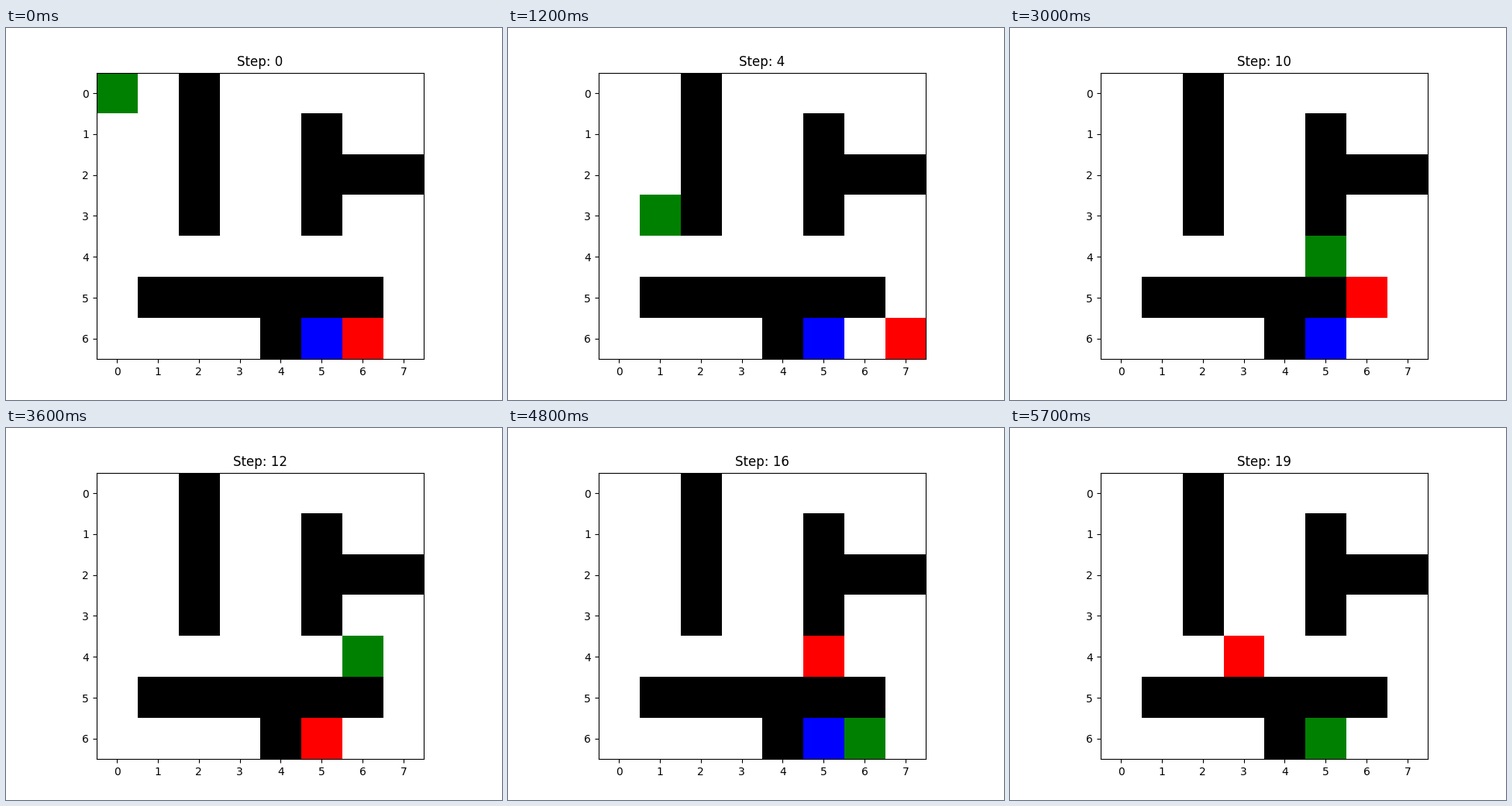
Recreate the animation shown at these times as a matplotlib script. Size 640x480 px, loop 6000 ms.

```python
import matplotlib.pyplot as plt
import numpy as np
from matplotlib.animation import FuncAnimation
from matplotlib.colors import to_rgb

MAZE = [
    "..#.....",
    "..#..#..",
    "..#..###",
    "..#..#..",
    "........",
    ".######.",
    "....#...",
]
GOAL = (6, 5)
STEP = {".": (0, 0), "N": (-1, 0), "S": (1, 0), "E": (0, 1), "W": (0, -1), "NW": (-1, -1)}
AGENT_MOVES = "E S S S S E E E E . . E E S S W W . ."
CHASER_MOVES = ". E W E N . . W . . W S . . N N S NW W"


def walk(start, moves):
    """Return the (row, column) cell held at every step."""
    steps = [start] + [STEP[m] for m in moves.split()]
    return [tuple(cell) for cell in np.cumsum(steps, axis=0)]


agent = walk((0, 0), AGENT_MOVES)
chaser = walk((6, 6), CHASER_MOVES)

base = np.array([[to_rgb("black" if c == "#" else "white") for c in row] for row in MAZE])
base[GOAL] = to_rgb("blue")


def grid(step):
    cells = base.copy()
    cells[agent[step]] = to_rgb("green")
    cells[chaser[step]] = to_rgb("red")
    return cells


fig, ax = plt.subplots(figsize=(6.4, 4.8), dpi=100)
image = ax.imshow(grid(0))
title = ax.set_title("Step: 0")


def update(step):
    image.set_data(grid(step))
    title.set_text(f"Step: {step}")
    return image, title


anim = FuncAnimation(fig, update, frames=len(agent), interval=300, repeat=True, repeat_delay=0)
plt.show()
```
